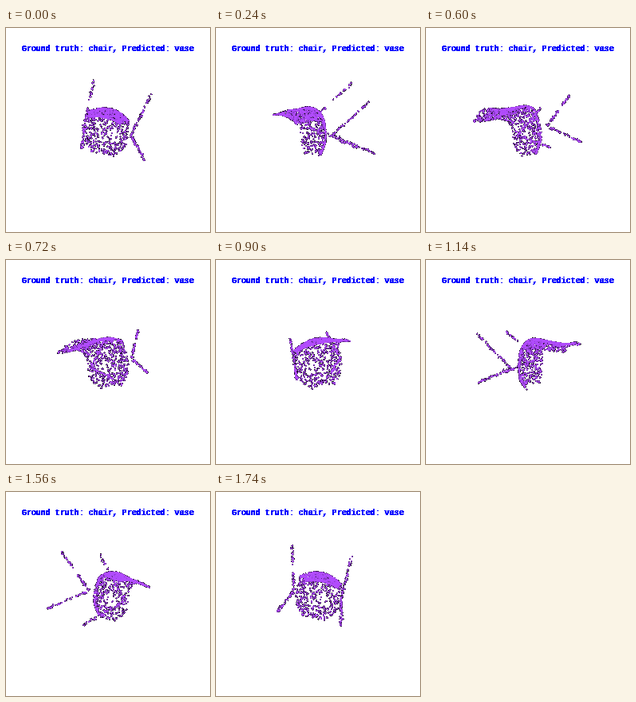
Recreate the animation shown at these times as a matplotlib script. Size 256 by 256 pixels, loop 1800 ms.

```python
import numpy as np
import matplotlib.pyplot as plt
from matplotlib.animation import FuncAnimation

SIZE, DPI = 256, 100
FRAMES, INTERVAL = 30, 60
DIST = 3.0
FOCAL = SIZE / 2 / np.tan(np.radians(30))
RADIUS = 0.01 * SIZE / 2
PURPLE = np.array([0.7, 0.3, 1.0])
TITLE = "Ground truth: chair, Predicted: vase"

rng = np.random.default_rng(7)

# Chair axes in the world: across the seat, up along it, towards the feet
ORIGIN = np.array([0.0, -0.02, 0.055])
AXES = np.array([[0.97, -0.203, -0.152],
                 [0.14, 0.967, -0.195],
                 [0.174, 0.19, 0.956]])


def bezier(t, *ctrl):
    """Cubic curve through (depth, height) control points."""
    weights = (1 - t)**3, 3 * t * (1 - t)**2, 3 * t**2 * (1 - t), t**3
    return sum(np.outer(w, p) for w, p in zip(weights, ctrl)).T


def seat(n):
    """Bucket with a rounded front; its sides curl away from the feet."""
    t, w = rng.uniform(0, 1, n), rng.uniform(-1, 1, n)
    depth, height = bezier(t, (-0.04, -0.38), (0.04, -0.1),
                           (0.07, 0.45), (-0.15, 0.44))
    half = 0.38 * np.sqrt(np.clip(0.25 + 3 * t, 0, 1))
    depth -= (0.16 - 0.08 * t**2) * w**2
    height -= 0.14 * t**2 * w**2
    return np.column_stack([w * half, height, depth])


def backrest(n):
    """Saddle: arched at both ends, nearly flat in the middle."""
    t, w = rng.uniform(0, 1, n), rng.uniform(-1, 1, n)
    depth, height = bezier(t, (-0.15, 0.44), (-0.33, 0.43),
                           (-0.55, 0.34), (-0.82, 0.47))
    depth -= 0.08 * (1 - t)**2 * w**2
    height -= (0.14 - 0.05 * t - 0.32 * t * (1 - t)) * w**2
    return np.column_stack([0.36 * w, height, depth])


def leg(side, rise, n=48):
    t = np.append(rng.uniform(0, 1, n - 1), 1)[:, None]
    joint = np.array([0.40 * side, 0, 0])
    foot = np.array([0.39 * side, 0.43 * rise, 0.76])
    return joint + (foot - joint) * t + rng.normal(0, 0.01, (n, 3))


parts = [seat(560), backrest(520)]
parts += [leg(side, rise) for side in (-1, 1) for rise in (-1, 1)]
points = ORIGIN + np.vstack(parts) @ AXES


def project(angle):
    x, y, z = points.T
    c, s = np.cos(angle), np.sin(angle)
    scale = FOCAL / (DIST - (z * c - x * s))
    return SIZE / 2 + (x * c + z * s) * scale, SIZE / 2 - y * scale


def render(k):
    """Soft round points: opacity falls to the rim, leaving dark outlines."""
    px, py = project(2 * np.pi * k / FRAMES)
    clear = np.ones((SIZE, SIZE))
    for dy in range(-2, 3):
        for dx in range(-2, 3):
            ix = np.floor(px).astype(int) + dx
            iy = np.floor(py).astype(int) + dy
            d2 = (ix + 0.5 - px)**2 + (iy + 0.5 - py)**2
            alpha = np.clip(1 - d2 / RADIUS**2, 0, 1)
            np.multiply.at(clear, (iy, ix), 1 - alpha)
    image = (1 - clear)[..., None] * PURPLE
    image[clear == 1] = 1
    return image


plt.rcParams["text.hinting"] = "force_autohint"
plt.rcParams["text.hinting_factor"] = 1

fig = plt.figure(figsize=(SIZE / DPI, SIZE / DPI), dpi=DPI, facecolor="white")
ax = fig.add_axes([0, 0, 1, 1])
ax.axis("off")
picture = ax.imshow(render(0), interpolation="nearest", aspect="auto")

# Struck twice, one pixel apart, for heavy stems
for x in (19, 20):
    fig.text(x / SIZE, 1 - 29 / SIZE, TITLE, family="Liberation Mono",
             weight="bold", size=10 * 72 / DPI, color="#0000ff",
             va="baseline", antialiased=False)


def update(k):
    picture.set_data(render(k))
    return [picture]


anim = FuncAnimation(fig, update, frames=FRAMES, interval=INTERVAL,
                     repeat=True, repeat_delay=0)
plt.show()
```
